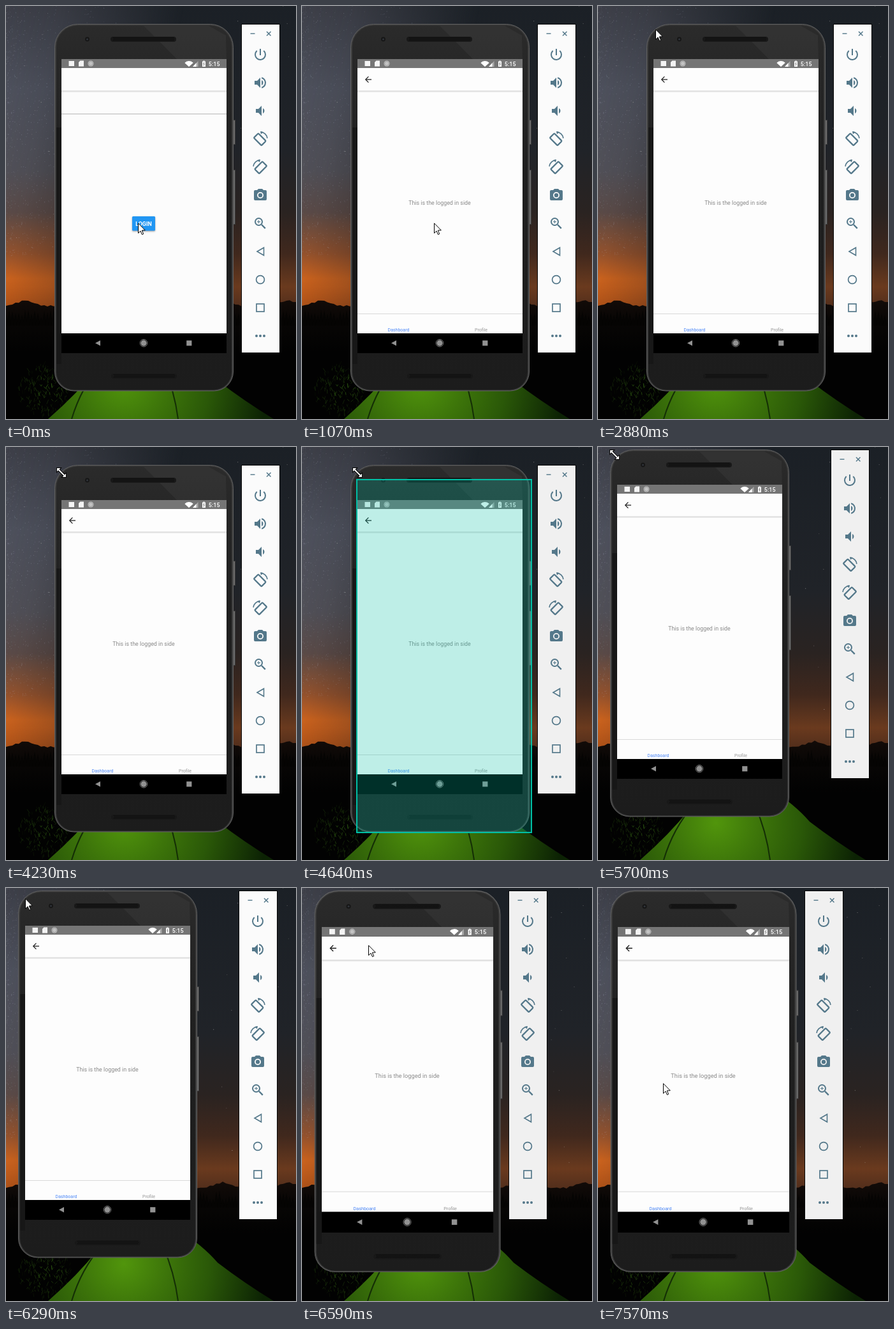
An HTML page with a canvas that plays this animation: 455 px wide and 646 px high, repeating every 8000 ms.

```html
<!DOCTYPE html>
<html lang="en">
<head>
<meta charset="utf-8">
<title>Emulator resize</title>
<style>
html, body { margin: 0; width: 100%; height: 100%; overflow: hidden; background: #000; }
canvas { display: block; width: 455px; height: 646px; }
</style>
</head>
<body>
<canvas id="stage" width="455" height="646"></canvas>
<script>
const W = 455, H = 646, LOOP = 8000, TICK = 120;
const ICON = '#54788a', GREY = '#929292';
const stage = document.getElementById('stage').getContext('2d');
let ctx = stage;

// ---- timing ----
const DRAG = 4640, DROP = 5700, SNAP = 6430;

function stepped(t, start, steps) {
  if (t < start) return 0;
  return Math.min(1, (Math.floor((t - start) / TICK) + 1) / steps);
}
const easeOut = p => 1 - (1 - p) ** 2;

// pointer legs: start, steps, end point
const LEGS = [
  [2180, 2, 67, 29], [2460, 1, 62, 2], [2610, 2, 99, 40], [2880, 1, 90, 36],
  [3540, 1, 87, 40], [4790, 6, 29, 16], [DROP, 1, 26, 12], [6290, 1, 30, 16],
  [6590, 1, 104, 89], [6740, 1, 207, 224], [7180, 1, 168, 279], [7330, 3, 102, 305]
];
function pointerAt(t) {
  let x = 207, y = 339;
  for (const [start, steps, toX, toY] of LEGS) {
    const p = easeOut(stepped(t, start, steps));
    x += (toX - x) * p;
    y += (toY - y) * p;
  }
  const onEdge = t >= 3540 && t < 6290 && !(t >= 3690 && t < 4090);
  return { x, y, onEdge };
}
function layoutAt(t) {
  if (t < DROP) return { x: 87, y: 83, scale: 1, barX: 370, barY: 29 };
  if (t < SNAP) return { x: 30, y: 59, scale: 1, barX: 366, barY: 5 };
  return { x: 31, y: 61, scale: 1.039, barX: 325, barY: 5 };
}

// ---- drawing helpers ----
function rect(x, y, w, h, color) {
  ctx.fillStyle = color;
  ctx.fillRect(x, y, w, h);
}
function round(x, y, w, h, r, fill, stroke, width = 1) {
  ctx.beginPath();
  ctx.roundRect(x, y, w, h, r);
  if (fill) { ctx.fillStyle = fill; ctx.fill(); }
  if (stroke) { ctx.strokeStyle = stroke; ctx.lineWidth = width; ctx.stroke(); }
}
function disc(x, y, r, color) {
  ctx.beginPath();
  ctx.arc(x, y, r, 0, Math.PI * 2);
  ctx.fillStyle = color;
  ctx.fill();
}
function arc(x, y, r, width, color, from = 0, to = Math.PI * 2) {
  ctx.beginPath();
  ctx.arc(x, y, r, from, to);
  ctx.lineWidth = width;
  ctx.strokeStyle = color;
  ctx.stroke();
}
function line(points, width, color) {
  ctx.beginPath();
  points.forEach(p => ctx.lineTo(...p));
  ctx.lineWidth = width;
  ctx.strokeStyle = color;
  ctx.stroke();
}
function poly(points, fill, stroke, width = 1) {
  ctx.beginPath();
  points.forEach(p => ctx.lineTo(...p));
  ctx.closePath();
  if (fill) { ctx.fillStyle = fill; ctx.fill(); }
  if (stroke) { ctx.strokeStyle = stroke; ctx.lineWidth = width; ctx.stroke(); }
}
function text(s, x, y, size, color, weight = 400) {
  ctx.font = `${weight} ${size}px Roboto, sans-serif`;
  ctx.textAlign = 'center';
  ctx.fillStyle = color;
  ctx.fillText(s, x, y);
}
function group(x, y, paint) {
  ctx.save();
  ctx.translate(x, y);
  paint();
  ctx.restore();
}
function shade(gradient, stops) {
  for (const p in stops) gradient.addColorStop(+p, stops[p]);
  return gradient;
}
const vertical = (y0, y1, stops) => shade(ctx.createLinearGradient(0, y0, 0, y1), stops);
const radial = (x, y, r, stops) => shade(ctx.createRadialGradient(x, y, 0, x, y, r), stops);

function onLayer(paint) {
  const outer = ctx, canvas = document.createElement('canvas');
  canvas.width = W;
  canvas.height = H;
  ctx = canvas.getContext('2d');
  paint();
  ctx = outer;
  return canvas;
}

// ---- night sky, hills and tent ----
let seed = 77;
const rnd = () => (seed = (seed * 16807) % 2147483647) / 2147483647;

function sky() {
  rect(0, 0, W, H, vertical(0, H, {
    0: '#1b2026', 0.35: '#202328', 0.5: '#2a2321', 0.6: '#40281d', 0.68: '#6a3a1e', 0.72: '#56301c', 1: '#000' }));
  const glow = onLayer(() => {
    rect(0, 0, W, H, vertical(0, H, {
      0: '#3d3f48', 0.2: '#50535f', 0.4: '#55545c', 0.5: '#604f4c', 0.6: '#a0582f', 0.66: '#da691e', 0.72: '#c25a18', 1: '#000' }));
    ctx.globalCompositeOperation = 'destination-in';
    rect(0, 0, W, H, shade(ctx.createLinearGradient(0, 0, 270, 50), {
      0: '#000', 0.3: 'rgba(0,0,0,.85)', 1: 'rgba(0,0,0,0)' }));
  });
  ctx.drawImage(glow, 0, 0);
  for (let i = 0; i < 1100; i++) {
    rect(rnd() * rnd() * 220, rnd() * 390, 1, 1, `rgba(190,195,215,${rnd() * 0.3})`);
  }
  for (let i = 0; i < 80; i++) {
    rect(rnd() * W, rnd() * 430, 1.2, 1, `rgba(200,195,190,${0.15 + rnd() * 0.4})`);
  }
}
function hills() {
  const ridge = x => [30, 340, 443].reduce(
    (y, peak) => y - 9 * Math.max(0, 1 - Math.abs(x - peak) / 28), 469) + Math.sin(x * 0.7);
  const edge = [[0, H]];
  for (let x = 0; x <= W; x += 5) edge.push([x, ridge(x)]);
  poly([...edge, [W, H]], vertical(460, 540, { 0: '#120b08', 0.4: '#080605', 1: '#020202' }));
  for (let x = 0; x < W; x += 5) {
    poly([[x - 4, 500], [x, 474 + rnd() * 13], [x + 4, 500]], '#050403');
  }
}
function bush() {
  for (let i = 0; i < 260; i++) {
    const a = rnd() * 6.3, d = Math.sqrt(rnd()) * 42, x = 62 + Math.cos(a) * d, y = 603 + Math.sin(a) * d;
    line([[x, y], [x + rnd() * 8 - 4, y - 2 - rnd() * 5]], 1, `rgba(46,88,18,${rnd() * (1 - d / 60)})`);
  }
}
function tent() {
  ctx.beginPath();
  ctx.moveTo(66, H);
  ctx.quadraticCurveTo(112, 606, 144, 566);
  ctx.quadraticCurveTo(205, 480, 262, 528);
  ctx.quadraticCurveTo(310, 560, 332, 586);
  ctx.quadraticCurveTo(374, 618, 420, H);
  ctx.fillStyle = radial(185, 588, 225, { 0: '#51950c', 0.3: '#3d750a', 0.6: '#2a5808', 1: '#0c2204' });
  ctx.fill();
  ctx.lineWidth = 2;
  ctx.strokeStyle = '#142e06';
  ctx.beginPath();
  ctx.moveTo(150, 560);
  ctx.quadraticCurveTo(118, 596, 103, H);
  ctx.moveTo(246, 560);
  ctx.quadraticCurveTo(264, 600, 270, H);
  ctx.stroke();
}
const scene = onLayer(() => { sky(); hills(); bush(); tent(); });

// ---- toolbar icons, each drawn around its centre ----
function power() {
  arc(0, 0, 8, 2, ICON, -0.85, Math.PI + 0.85);
  rect(-1, -9, 2, 10, ICON);
}
function speaker() {
  poly([[-9, -3], [-5, -3], [0, -8], [0, 8], [-5, 3], [-9, 3]], ICON);
  ctx.beginPath();
  ctx.arc(0, 0, 4.5, -1.1, 1.1);
  ctx.fillStyle = ICON;
  ctx.fill();
  rect(0, -5, 2, 10, ctx.barColor);
}
function louder() {
  speaker();
  arc(0, 0, 8, 2, ICON, -1.3, 1.3);
}
function softer() {
  group(2, 0, speaker);
}
function rotateLeft() {
  arc(0, 0, 11, 1.7, ICON, -1.5, -0.1);
  poly([[0, -12], [5, -11], [1, -7.5]], ICON);
  group(-0.7, 0.7, () => {
    ctx.rotate(-Math.PI / 4);
    round(-5, -8.5, 10, 17, 1.5, null, ICON, 2.3);
  });
}
function rotateRight() {
  ctx.scale(-1, 1);
  rotateLeft();
}
function camera() {
  round(-10, -8, 20, 16, 2, ICON);
  poly([[-5, -8], [-3, -10], [3, -10], [5, -8]], ICON);
  arc(0, 0, 4.1, 1.8, ctx.barColor);
}
function zoom() {
  arc(-2.5, -2.5, 5.5, 2, ICON);
  line([[2, 2], [7.8, 7.8]], 2.4, ICON);
  rect(-5, -3, 5, 1, ICON);
  rect(-3, -5, 1, 5, ICON);
}
function back() {
  poly([[-5, 0], [5.5, -6], [5.5, 6]], null, ICON, 1.6);
}
function circle() {
  arc(0, 0, 6.4, 1.7, ICON);
}
function square() {
  ctx.strokeStyle = ICON;
  ctx.lineWidth = 1.7;
  ctx.strokeRect(-6, -6, 12, 12);
}
function more() {
  [-6, 0, 6].forEach(x => disc(x, 0, 2, ICON));
}
const TOOLS = [power, louder, softer, rotateLeft, rotateRight, camera, zoom, back, circle, square, more];

function toolbar(x, y, color) {
  ctx.barColor = color;
  group(x, y, () => {
    rect(-1, -1, 61, 515, '#050505');
    rect(0, 0, 59, 513, color);
    rect(13.5, 13.5, 7, 1.4, ICON);
    line([[39, 11], [45.5, 17.5]], 1.5, ICON);
    line([[45.5, 11], [39, 17.5]], 1.5, ICON);
    TOOLS.forEach((tool, i) => group(29, 47 + 44 * i, tool));
  });
}

// ---- phone, in coordinates of its first position ----
function grille(x, y) {
  round(x, y, 103, 8, 4, '#181818');
  for (let i = 4; i < 100; i += 2) {
    for (let j = 1; j < 7; j += 2) rect(x + i + (j >> 1) % 2, y + j, 1, 1, '#060606');
  }
}
function sideButton(y, h) {
  rect(356, y, 4, h, '#3a3a3a');
  rect(357.5, y + 1, 1.5, h - 2, '#777');
}
function shell() {
  sideButton(178, 39);
  sideButton(256, 86);
  round(76.5, 28.5, 280, 573.5, [36, 36, 30, 30], '#3b3b3b', '#626262');
  round(79, 30.5, 275, 570, [33, 33, 28, 28],
    vertical(30, 600, { 0: '#2b2b2b', 0.1: '#272727', 0.4: '#1f1f1f', 1: '#1c1c1c' }));
  poly([[216, 31], [318, 31], [345, 46], [346, 83], [268, 83]], 'rgba(255,255,255,.035)');
  rect(79, 190, 8, 370, '#171717');
  disc(127.5, 52, 3.4, '#161616');
  disc(127.5, 52, 1.5, '#30343a');
  grille(164, 48);
  grille(165, 575);
}
function statusBar() {
  rect(87, 83, 259, 14, '#757575');
  rect(98.5, 86, 8.5, 8, '#f4f4f4');
  poly([[116.5, 85.5], [122, 85.5], [122, 94.5], [114, 94.5], [114, 88]], '#f4f4f4');
  disc(133, 90, 4.5, '#c4c4c4');
  arc(133, 90, 3.4, 1, '#9e9e9e');
  ctx.beginPath();
  ctx.moveTo(287, 95);
  ctx.arc(287, 95, 9, -2.4, -0.74);
  ctx.fillStyle = '#fff';
  ctx.fill();
  poly([[293, 95], [301.5, 95], [301.5, 86]], '#a9a9a9');
  poly([[293, 95], [298.5, 95], [298.5, 89]], '#fff');
  rect(308, 86.5, 5, 8.5, '#fff');
  rect(309.5, 85.5, 2, 1.2, '#fff');
  line([[311, 87.8], [309.8, 90.7], [311.2, 90.7], [310, 93.6]], 0.9, '#757575');
  text('5:15', 326.7, 93.5, 9, '#fff', 500);
}
function navBar() {
  rect(87, 512, 259, 31, '#000');
  poly([[140, 527.2], [148, 523], [148, 531.4]], GREY);
  disc(216, 527.2, 4.6, GREY);
  arc(216, 527.2, 5.8, 0.8, GREY);
  rect(283.2, 523.2, 8.2, 8.2, GREY);
}
function divider(y) {
  rect(87, y - 0.5, 259, 1, '#cfcfcf');
  rect(87, y + 0.5, 259, 1, '#dedede');
}
function login(press) {
  rect(87, 97, 259, 415, '#fcfcfc');
  divider(133);
  divider(168.5);
  ctx.save();
  ctx.shadowColor = 'rgba(0,0,0,.4)';
  ctx.shadowBlur = 2.5;
  ctx.shadowOffsetY = 1;
  round(198, 329, 36, 22.5, 1.5, '#2196f3');
  ctx.restore();
  ctx.save();
  round(198, 329, 36, 22.5, 1.5);
  ctx.clip();
  disc(210, 341, press * 16, 'rgba(255,255,255,.2)');
  ctx.restore();
  text('LOGIN', 216, 343.7, 8.9, '#fff', 700);
}
function home(p) {
  ctx.save();
  ctx.beginPath();
  ctx.rect(87, 97, 259, 415);
  ctx.clip();
  ctx.globalAlpha = p;
  rect(87, 97, 259, 415, '#fdfdfd');
  divider(133);
  line([[109, 115], [100, 115]], 1.3, '#222');
  line([[104.4, 110.4], [99.8, 115], [104.4, 119.6]], 1.3, '#222');
  ctx.translate(0, (1 - p) * 40);
  text('This is the logged in side', 216, 310.5, 8.9, '#8a8a8a');
  rect(87, 481, 259, 1, '#d9d9d9');
  text('Dashboard', 151.5, 509.4, 7, '#4a86f7');
  text('Profile', 281, 509.4, 7, '#989898');
  ctx.restore();
}
function phone(t, { x, y, scale }) {
  const enter = easeOut(stepped(t, 830, 3));
  group(x, y, () => {
    ctx.scale(scale, scale);
    ctx.translate(-87, -83);
    shell();
    if (enter < 1) login(stepped(t, 560, 2));
    if (enter > 0) home(enter);
    statusBar();
    navBar();
  });
}

// ---- resize frame and pointer ----
function resizeFrame(mouseX) {
  const p = (87 - mouseX) / 58;
  const x = Math.round(86 - 17 * p), y = Math.round(51 - 35 * p);
  rect(x, y, 360 - x, 603 - y, 'rgba(0,191,165,.25)');
  ctx.strokeStyle = '#00bfa5';
  ctx.lineWidth = 2;
  ctx.strokeRect(x, y, 360 - x, 603 - y);
}
function doubleArrow() {
  ctx.rotate(Math.PI / 4);
  const top = [[-10.5, 0], [-5.5, -5], [-5.5, -1.5], [5.5, -1.5], [5.5, -5], [10.5, 0]];
  const bottom = top.slice(1, -1).reverse().map(([x, y]) => [x, -y]);
  poly([...top, ...bottom], '#fff', '#000');
}
function arrow() {
  poly([[0.5, 0.8], [0.5, 16.3], [4, 12.9], [6.5, 18.5], [8.7, 17.5], [6.3, 12], [11.3, 11.8]], '#fff', '#000');
}

function draw(now) {
  const t = now % LOOP, place = layoutAt(t), mouse = pointerAt(t);
  const inactive = (t >= DRAG && t < 6290) || t >= SNAP;
  ctx.drawImage(scene, 0, 0);
  phone(t, place);
  toolbar(place.barX, place.barY, inactive ? '#f0f0f0' : '#fbfbfb');
  if (t >= DRAG && t < DROP) resizeFrame(mouse.x);
  group(mouse.x, mouse.y, mouse.onEdge ? doubleArrow : arrow);
  requestAnimationFrame(draw);
}
requestAnimationFrame(draw);
</script>
</body>
</html>
```
